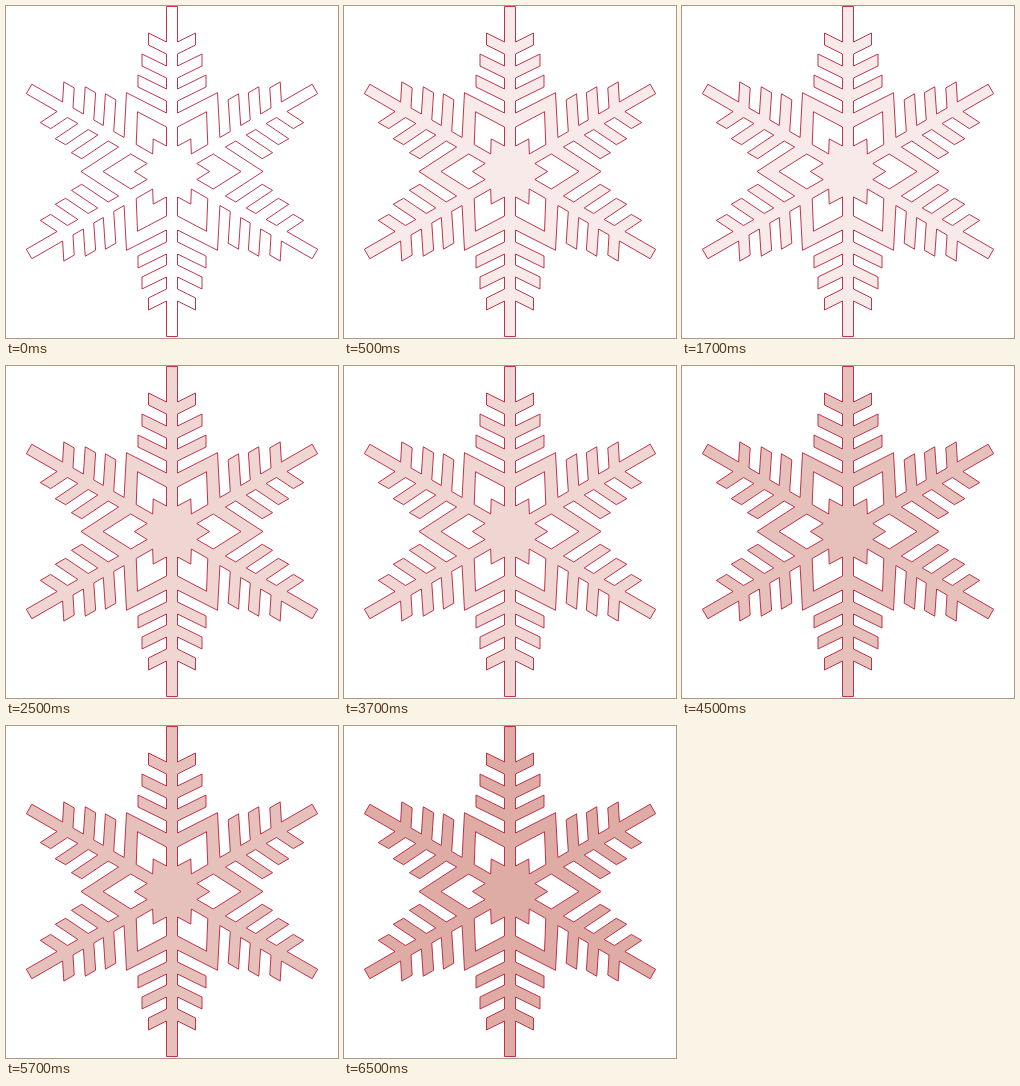
Recreate the animation shown at these times as an HTML page with a canvas. Size 332 by 332 pixels, loop 8 s.

```html
<!DOCTYPE html>
<html lang="en">
<head>
<meta charset="utf-8">
<title>Snowflake</title>
<style>
html, body { margin: 0; width: 100%; height: 100%; overflow: hidden; background: #fff; }
canvas { display: block; }
</style>
</head>
<body>
<canvas id="stage" width="332" height="332"></canvas>
<script>
const ctx = document.getElementById('stage').getContext('2d');
const LOOP = 8000, STEP = 2000, FIRST = 500;
const CX = 166, CY = 165.5, HALF = 5.5;
const FILLS = ['#ffffff', '#f7eae8', '#efd6d2', '#e6c1bb', '#deaca5'];

// Each twig: outer x, outer top, shaft top; every twig is 12 thick.
const TWIGS = [[34, 96.5, 82.5], [30, 117.5, 105.5], [23.5, 138.5, 129.5]];

const mirror = pts => pts.map(([x, y]) => [-x, y]).reverse();
const polar = (r, deg) => {
  const a = deg * Math.PI / 180;
  return [r * Math.sin(a), -r * Math.cos(a)];
};
const turn = ([x, y], deg) => {
  const a = deg * Math.PI / 180, c = Math.cos(a), s = Math.sin(a);
  return [x * c - y * s, x * s + y * c];
};

function addLoop(path, pts) {
  pts.forEach(([x, y], i) => path[i ? 'lineTo' : 'moveTo'](CX + x, CY + y));
  path.closePath();
}

function buildFlake() {
  const side = [[-HALF, -58.5]];
  for (const [x, top, root] of TWIGS) {
    side.push([-HALF, 12 - root], [-x, 12 - top], [-x, -top], [-HALF, -root]);
  }
  side.push([-HALF, -165]);
  const arm = [polar(91, -30), ...side, ...mirror(side)];

  // Opening between two neighbouring arms, symmetric about the upward axis.
  const edge = [turn([HALF, -25.5], -30), turn([HALF, -44.5], -30)];
  const hole = [[0, -37.6], ...edge, [0, -69], ...mirror(edge)];

  const path = new Path2D(), outline = [];
  for (let deg = 0; deg < 360; deg += 60) {
    outline.push(...arm.map(p => turn(p, deg)));
    addLoop(path, hole.map(p => turn(p, deg + 30)));
  }
  addLoop(path, outline);
  return path;
}

const flake = buildFlake();

function draw(now) {
  const t = now % LOOP;
  const level = Math.floor((t + STEP - FIRST) / STEP);
  ctx.fillStyle = '#fff';
  ctx.fillRect(0, 0, 332, 332);
  ctx.fillStyle = FILLS[level];
  ctx.fill(flake, 'evenodd');
  ctx.strokeStyle = '#b8203a';
  ctx.lineWidth = 0.9;
  ctx.stroke(flake);
}

const start = performance.now();
function tick() {
  draw(performance.now() - start);
  requestAnimationFrame(tick);
}
tick();
</script>
</body>
</html>
```
